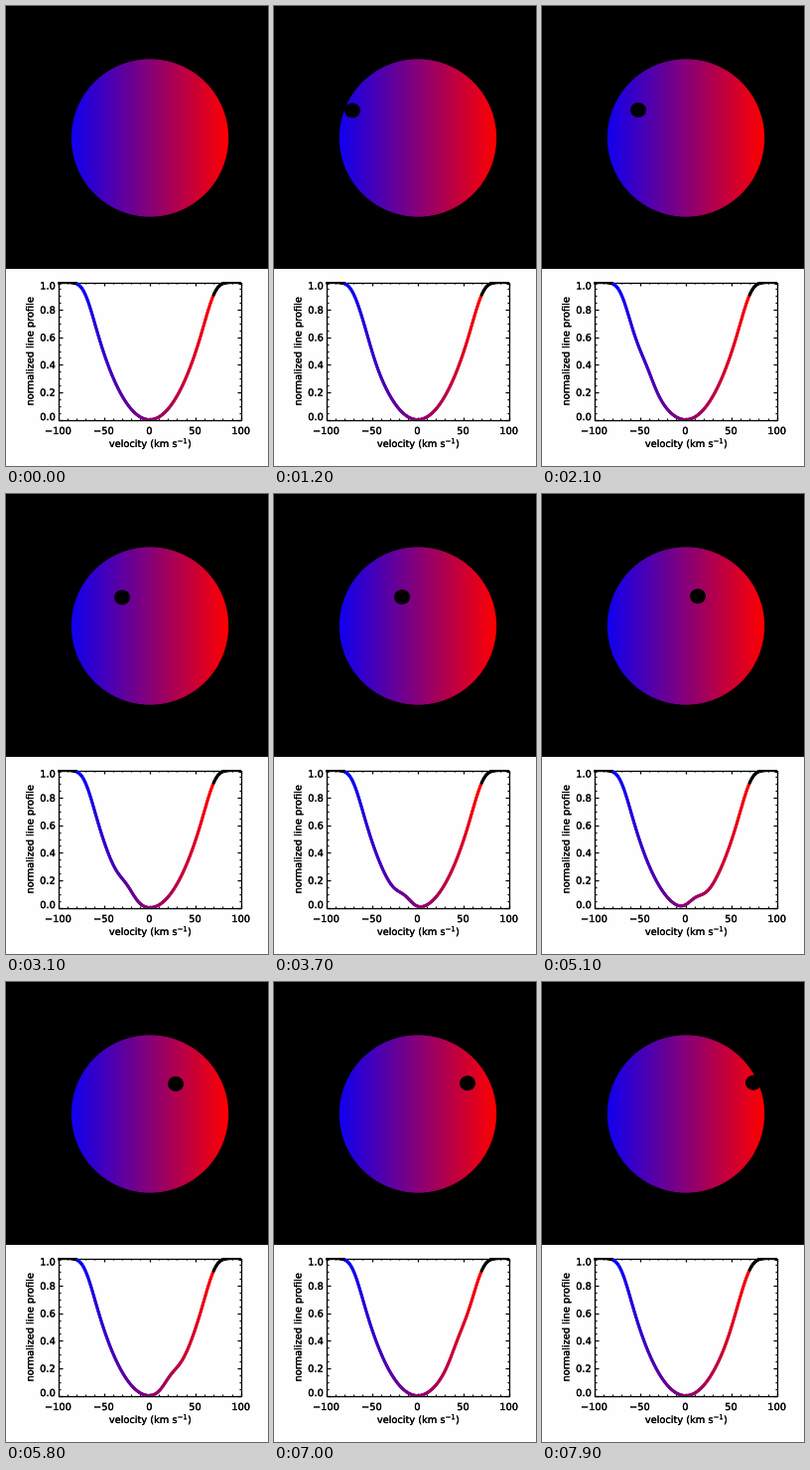
Recreate the animation shown at these times as a matplotlib script. Size 264 by 462 pixels, loop 8 s.

```python
import numpy as np
import matplotlib.pyplot as plt
from matplotlib.animation import FuncAnimation
from matplotlib.collections import LineCollection
from matplotlib.patches import Circle, Ellipse, Rectangle
from matplotlib.patheffects import Normal, Stroke

W, H, DPI = 264, 462, 66
PX = 72 / DPI                       # points per pixel
FRAMES, STEP = 80, 100

STAR_X, STAR_Y, STAR_R = 145, 132.5, 79.2
LEFT, RIGHT, TOP, BOTTOM = 52.5, 236.8, 277.5, 415.5
VMAX = 70                           # rotation speed at the limb, km/s
VBLUE = -79                         # blue end of the colour scale, km/s
SIGMA = 7.2                         # line broadening, km/s
LIMB = 0.88                         # linear limb darkening
SHADOW_R = 7.2 / STAR_R             # radius of the blocked light

plt.rcParams["font.family"] = "DejaVu Sans"


def px(v):
    return LEFT + (v + 100) / 200 * (RIGHT - LEFT)


def py(f):
    return BOTTOM - f * (BOTTOM - TOP)


def doppler(v):
    """Blue to red along the velocity scale."""
    t = np.clip((v - VBLUE) / (VMAX - VBLUE), 0, 1)
    return np.stack([t, 0 * t, 1 - t], axis=-1)


def planet_pos(i):
    return 55 + 2 * i, 105.6 - 0.057 * i


vel = np.arange(-140, 140.25, 0.5)
u = vel / VMAX
kernel = np.exp(-0.5 * (np.arange(-40, 40.25, 0.5) / SIGMA) ** 2)
kernel /= kernel.sum()
chord2 = np.clip(1 - u**2, 0, None)
star_light = (1 - LIMB) * 2 * np.sqrt(chord2) + LIMB * np.pi / 2 * chord2
full_depth = np.convolve(star_light, kernel, "same").max()
shown = np.abs(vel) <= 100


def profile(i):
    """Rotationally broadened line minus the light hidden by the planet."""
    x, y = planet_pos(i)
    x, y = (x - STAR_X) / STAR_R, (y - STAR_Y) / STAR_R
    half = np.sqrt(np.clip(SHADOW_R**2 - (u - x) ** 2, 0, None))
    s = np.linspace(-0.95, 0.95, 20)[:, None]
    mu2 = 1 - u**2 - (y + s * half) ** 2
    mu = np.sqrt(np.clip(mu2, 0, None))
    light = np.where(mu2 > 0, 1 - LIMB + LIMB * mu, 0)
    hidden = light.mean(axis=0) * 2 * half
    depth = np.convolve(star_light - hidden, kernel, "same") / full_depth
    return 1 - depth[shown]


fig = plt.figure(figsize=(W / DPI, H / DPI), dpi=DPI, facecolor="#fefefe")
ax = fig.add_axes([0, 0, 1, 1])
ax.axis("off")

# Star and planet
ax.add_patch(Rectangle((0, 0), W, 264, color="black", lw=0))
shades = doppler(np.linspace(-VMAX, VMAX, 160))[None]
disk = ax.imshow(shades, aspect="auto", interpolation="nearest", zorder=2,
                 extent=(STAR_X - 80, STAR_X + 80, STAR_Y + 80.5, STAR_Y - 80.5))
disk.set_clip_path(Circle((STAR_X, STAR_Y), STAR_R, transform=ax.transData))
planet = ax.add_patch(Ellipse((0, 0), 16, 15, color="black", lw=0, zorder=3))
ax.set_xlim(0, W)
ax.set_ylim(H, 0)

# Plot frame with inward ticks on all sides
ax.add_patch(Rectangle((LEFT, TOP), RIGHT - LEFT, BOTTOM - TOP, fill=False,
                       ec="black", lw=1.3 * PX, zorder=4))
ticks = []
for n in range(21):
    x, y = px(-100 + 10 * n), py(n / 20)
    dy = 3 if n % 5 == 0 else 1.7
    dx = 4 if n % 4 == 0 else 2
    ticks += [[(x, BOTTOM), (x, BOTTOM - dy)], [(x, TOP), (x, TOP + dy)],
              [(LEFT, y), (LEFT + dx, y)], [(RIGHT, y), (RIGHT - dx, y)]]
ax.add_collection(LineCollection(ticks, colors="black", lw=1.2 * PX, zorder=4))


def label(x, y, text, **kw):
    opts = dict(ha="center", va="baseline", fontsize=9.8 * PX, color="black")
    t = ax.text(x, y, text, **{**opts, **kw})
    t.set_path_effects([Stroke(linewidth=0.25 * PX, foreground="black"),
                        Normal()])


for v in range(-100, 101, 50):
    label(px(v) - 0.3, 430, str(v).replace("-", "\u2212"))
for n in range(6):
    base = {0: 416, 5: 284.5}.get(n, py(n / 5) + 3.7)
    label(49.5, base, f"{n / 5:.1f}", ha="right")
label(145.7, 443, r"velocity (km s$^{\mathregular{-1}}$)")
label(24.5, 347, "normalized line profile", rotation=90, va="center")

# Line profile, coloured only along the velocity scale
v = vel[shown]
mid = (v[1:] + v[:-1]) / 2
colors = doppler(mid)
colors[(mid < VBLUE) | (mid > VMAX)] = 0
curve = LineCollection([], colors=colors, lw=3 * PX, capstyle="round",
                       zorder=5)
ax.add_collection(curve, autolim=False)
curve.set_clip_path(Rectangle((LEFT - 0.5, TOP - 0.5), RIGHT - LEFT + 1,
                              BOTTOM - TOP + 1, transform=ax.transData))


def draw(i):
    planet.center = planet_pos(i)
    pts = np.column_stack([px(v), py(profile(i))])
    curve.set_segments(np.stack([pts[:-1], pts[1:]], axis=1))
    return planet, curve


anim = FuncAnimation(fig, draw, frames=FRAMES, interval=STEP,
                     init_func=lambda: draw(0), repeat=True, repeat_delay=0)
plt.show()
```
